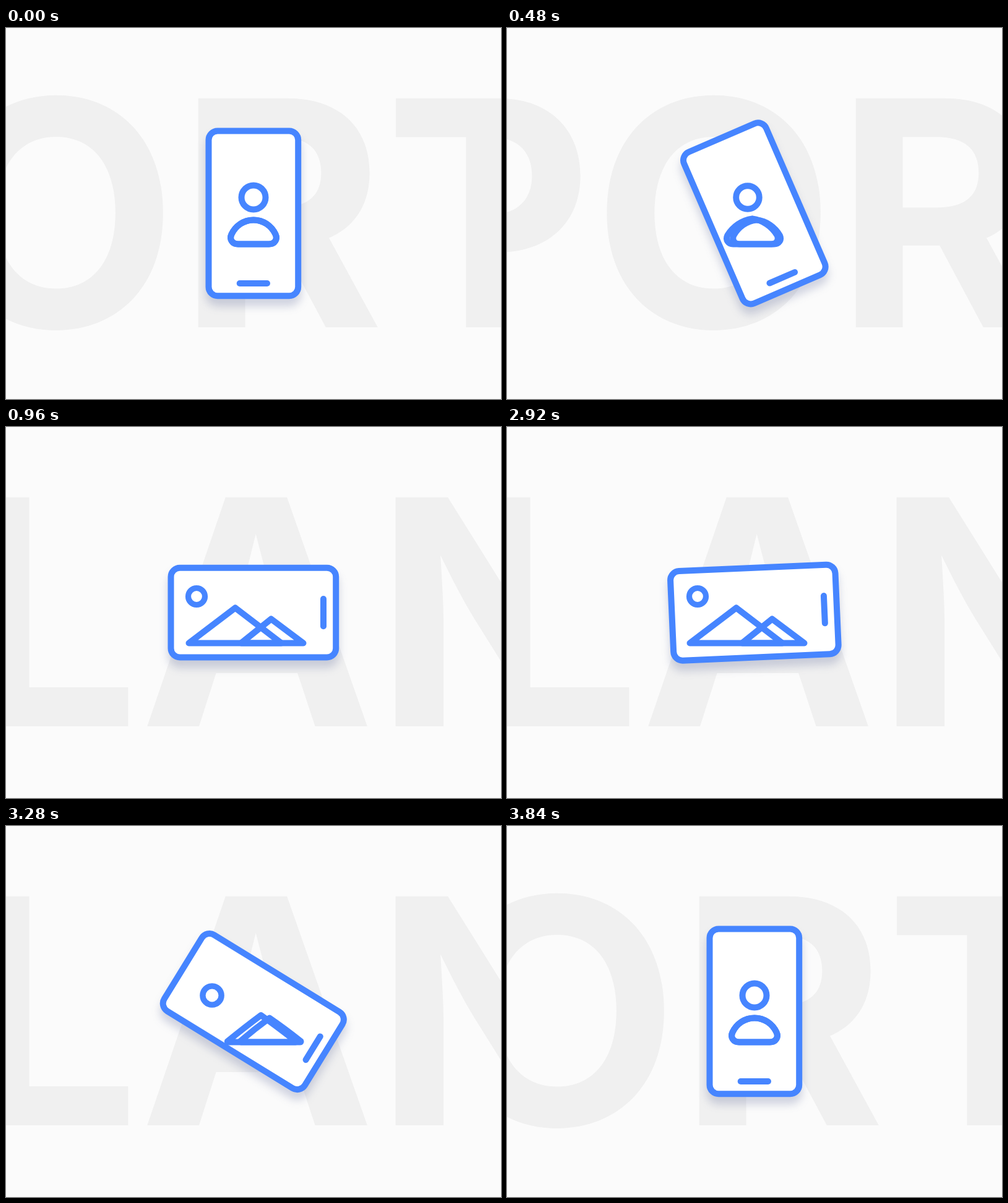
An HTML page for the animation above (3.88 s loop, 800 by 600 pixels).

```html
<!DOCTYPE html>
<html lang="en">
<head>
<meta charset="utf-8">
<title>Portrait and landscape</title>
<style>
  html, body { margin: 0; width: 100%; height: 100%; overflow: hidden; background: #fbfbfb; }
  svg { display: block; width: 100vw; height: 100vh; }
  text { font: 700 509px Inter, sans-serif; fill: #f0f0f0; }
  .line { fill: none; stroke: #4685ff; stroke-width: 10; stroke-linecap: round; stroke-linejoin: round; }
</style>
</head>
<body>
<svg viewBox="0 0 800 600">
  <defs>
    <filter id="shadow" filterUnits="userSpaceOnUse" x="150" y="50" width="500" height="500" color-interpolation-filters="sRGB">
      <feDropShadow dx="0" dy="12" stdDeviation="7" flood-color="#3a4b82" flood-opacity=".22"/>
    </filter>
  </defs>
  <text id="portrait" y="484">PORTRAIT</text>
  <text id="landscape" y="484">LANDSCAPE</text>
  <g filter="url(#shadow)">
    <g id="phone">
      <rect class="line" x="327.5" y="166.5" width="144.7" height="266.7" rx="14.5" style="fill:#fff"/>
      <path class="line" d="M377.7 413H422"/>
    </g>
  </g>
  <circle id="head" class="line" cy="274"/>
  <path id="big" class="line"/>
  <path id="small" class="line"/>
</svg>
<script>
const $ = id => document.getElementById(id);
const LOOP = 3880, STEP = 40, BACK = 2880, SWAP = 15;
const lerp = (a, b, p) => a + (b - a) * p;
const mix = (a, b, p) => a.map((v, i) => lerp(v, b[i], p));

// Smooth curve through [step, value] points, without overshoot between them.
function track(...pts) {
  const slope = pts.slice(1).map(([x, y], i) => (y - pts[i][1]) / (x - pts[i][0]));
  const tangent = pts.map((_, i) => {
    const a = slope[i - 1], b = slope[i];
    return a * b > 0 ? 2 * a * b / (a + b) : 0;
  });
  return x => {
    if (x <= pts[0][0]) return pts[0][1];
    const i = pts.findIndex(p => p[0] >= x) - 1;
    if (i < 0) return pts[pts.length - 1][1];
    const [x0, y0] = pts[i], [x1, y1] = pts[i + 1];
    const w = x1 - x0, s = (x - x0) / w, r = 1 - s;
    return y0 * r * r * (1 + 2 * s) + y1 * s * s * (3 - 2 * s)
      + w * s * r * (tangent[i] * r - tangent[i + 1] * s);
  };
}

// Progress from portrait (0) to landscape (1).
const morph = track([1, 0], [6, .01], [9, .035], [12, .12], [13, .38], [14, .7], [16, .92], [20, 1]);
const forward = {
  turn: track([0, 0], [1, -.028], [4, -.07], [8, -.02], [12, .26], [13, .53], [14, .8], [16, .94], [22, 1]),
  head: morph, small: morph, big: morph
};
const backward = {
  turn: track([0, 1], [1, 1.028], [4, 1.07], [7, .98], [10, .649], [12, .36], [14, .156], [16, .084], [23, 0]),
  head: track([1, 1], [5, .98], [10, .728], [13, .35], [16, .098], [22, 0]),
  small: track([3, 1], [10, .91], [13, .48], [16, .1], [22, 0]),
  big: track([1, 1], [5, .88], [10, .25], [14, 0])
};

// Every outline is one start point and four cubic segments.
const body = [375, 349.5, 366, 349.5, 360.5, 342, 364.5, 333.5, 371, 320, 384, 310.5, 400, 310.5,
  416, 310.5, 429, 320, 435.5, 333.5, 439.5, 342, 434, 349.5, 425, 349.5];
function triangle(left, top, right) {
  const side = (a, b) => [...mix(a, b, 1 / 3), ...mix(a, b, 2 / 3), ...b];
  return [...left, ...side(left, left), ...side(left, top), ...side(top, right), ...side(right, right)];
}
const bigHill = triangle([295.5, 349.5], [370.5, 292.5], [445, 349.5]);
const smallHill = triangle([380, 349.5], [428.5, 310.5], [480.5, 349.5]);
const outline = p => `M${p.slice(0, 2)}C${p.slice(2).map(v => v.toFixed(2))}Z`;

// Places a word so that the ink of one letter begins at the given x.
const pen = document.createElement('canvas').getContext('2d');
pen.font = '700 509px Inter, sans-serif';
function startOf(word, index, inkLeft) {
  const before = pen.measureText(word.slice(0, index + 1)).width - pen.measureText(word[index]).width;
  return inkLeft - before + pen.measureText(word[index]).actualBoundingBoxLeft;
}
const portraitX = startOf('PORTRAIT', 2, 309);
$('landscape').setAttribute('x', startOf('LANDSCAPE', 1, 224));

function draw(time) {
  const step = Math.floor(time % LOOP / STEP);
  const returning = step >= BACK / STEP;
  const k = returning ? step - BACK / STEP : step;
  const motion = returning ? backward : forward;
  const showPortrait = returning === (k >= SWAP);

  $('portrait').style.display = showPortrait ? '' : 'none';
  $('landscape').style.display = showPortrait ? 'none' : '';
  $('portrait').setAttribute('x', portraitX + (returning ? 0 : 253 * (k / 12) ** 4));

  $('phone').setAttribute('transform', `rotate(${-90 * motion.turn(k)} 400 300)`);

  const h = motion.head(k);
  $('head').setAttribute('cx', lerp(400, 308, h));
  $('head').setAttribute('r', lerp(19.5, 13.5, h));
  $('head').style.strokeWidth = lerp(10, 9.2, h);

  const small = mix(body, smallHill, motion.small(k));
  // Going back, the big hill folds into the small one first.
  const big = mix(returning ? small : body, bigHill, motion.big(k));
  $('small').setAttribute('d', outline(small));
  $('big').setAttribute('d', outline(big));
}

const start = performance.now();
function tick() {
  draw(performance.now() - start);
  requestAnimationFrame(tick);
}
tick();
</script>
</body>
</html>
```
